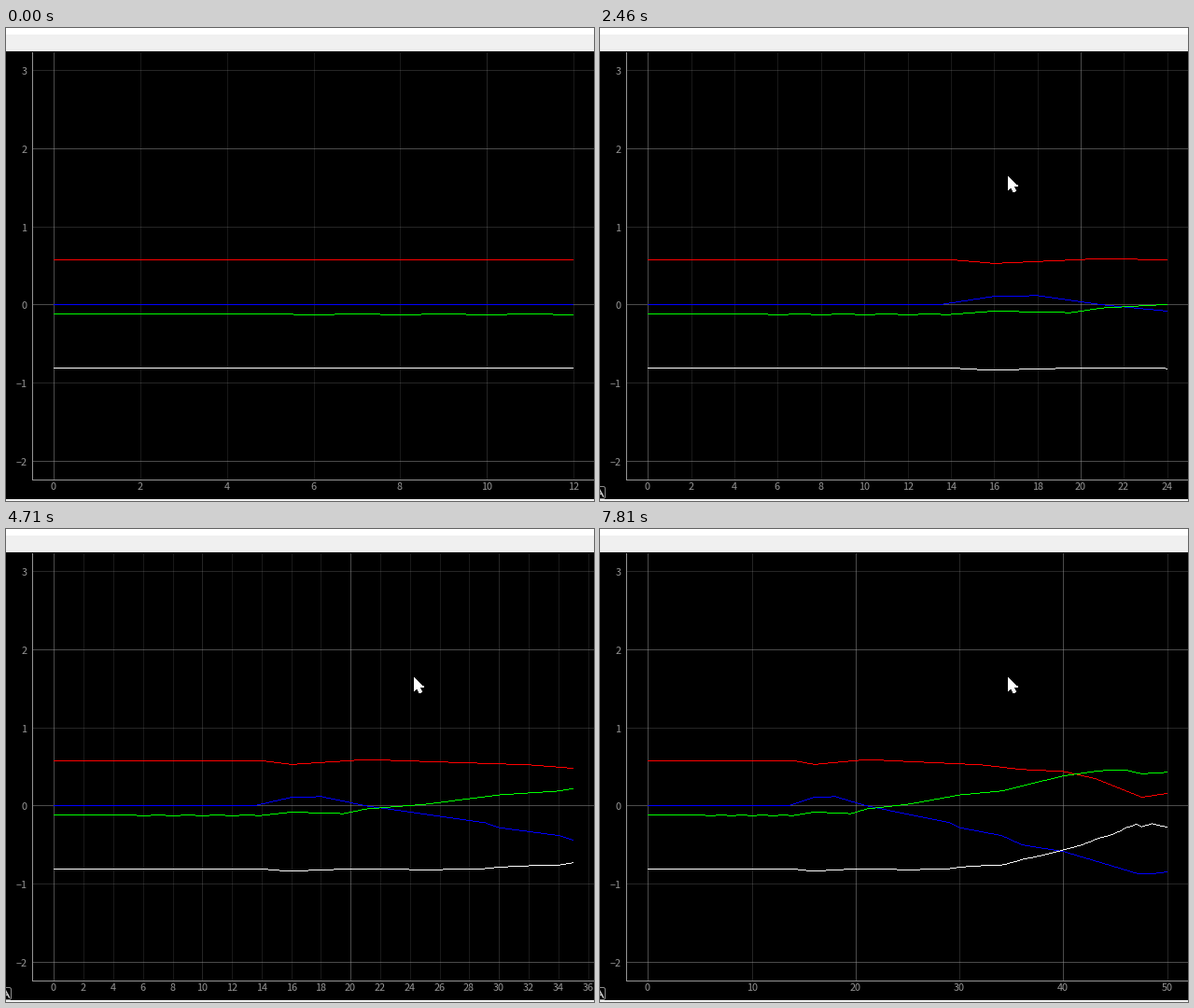
These frames come from a looping animation (630 px wide and 507 px high, 8 s). A matplotlib script:

```python
import numpy as np
import matplotlib.pyplot as plt
from matplotlib.animation import FuncAnimation
from matplotlib.collections import LineCollection
from matplotlib.patches import FancyBboxPatch, Polygon, Rectangle

W, H, DPI = 630, 507, 64
PX = 72 / DPI                       # one pixel in points
STEP, LOOP = 20, 8000               # ms

LEFT, TOP, BOTTOM = 28, 26, 484     # plot area edges
X0, SPAN = 51.9, 556.25             # pixel of sample 0, pixels to newest sample
Y0, UNIT = 296.75, 83.75            # pixel of value 0, pixels per unit
GREY = 150 / 255

SAMPLE_MS, SAMPLE_LEAD = 1240 / 6, 44
MOUSE_START, MOUSE_MS, MOUSE_STEPS = 570, 100, 8
MOUSE_FROM, MOUSE_TO = np.array([336, 452]), np.array([437, 159])
ARROW = np.array([(0, 0), (0, 14.5), (3.4, 11.4), (6, 16.8), (8.6, 15.7),
                  (6.1, 10.5), (10.6, 10.5)])

fig = plt.figure(figsize=(W / DPI, H / DPI), dpi=DPI, facecolor="white")
ax = fig.add_axes([0, 0, 1, 1])
ax.set(xlim=(0, W), ylim=(H, 0))
ax.axis("off")


def path(x, *points):
    return np.interp(x, *zip(*points))


def rotation(x):
    """Components of a unit quaternion at sample position x."""
    red = path(x, (14, .577), (16, .53), (21, .592), (32, .525), (36, .465),
               (40, .44), (43, .35), (47.5, .11), (50, .16))
    green = path(x, (14, -.122), (16, -.08), (19.5, -.1), (21, -.04),
                 (25, .02), (30, .14), (34, .19), (40, .385), (43.5, .45),
                 (46, .457), (47.5, .41), (50, .43))
    green = green - .005 * np.cos(np.pi * x) * ((x > 5) & (x < 14))
    blue = path(x, (13.5, .003), (16, .11), (18, .118), (21, 0), (29, -.215),
                (30, -.28), (34, -.38), (36, -.5), (40, -.585), (47, -.863),
                (48.5, -.87), (50, -.845))
    white = -np.sqrt(1 - red ** 2 - green ** 2 - blue ** 2)
    return blue, red, green, white


def strokes(segments, color, z):
    lines = LineCollection(segments, colors=color, linewidths=PX,
                           capstyle="butt", zorder=z)
    lines.set_snap(False)
    return ax.add_collection(lines, autolim=False)


def label(x, y, text, align):
    return ax.text(x, y, text, ha=align, va="baseline", color=(GREY,) * 3,
                   fontsize=10.8 * PX, family="Noto Sans CJK JP", zorder=5)


def shade(level):
    return (GREY, GREY, GREY, .5 / level)


def runs(cols, rows):
    """Horizontal one-pixel strokes covering the given pixel rows."""
    first = np.r_[0, np.flatnonzero(np.diff(rows)) + 1]
    starts = cols[first]
    ends = np.r_[starts[1:], cols[-1] + 1]
    return [[(a, y + .5), (b, y + .5)]
            for a, b, y in zip(starts, ends, rows[first])]


def add_box(y, height, color):
    ax.add_patch(Rectangle((0, y), W, height, fc=color, lw=0, zorder=0))


add_box(7, H - 7, "#f0f0f0")
add_box(25, 480, "black")

# Value axis
for v in range(-2, 4):
    row = int(Y0 - UNIT * v)
    strokes([[(LEFT, row + .5), (W, row + .5)]], [shade(1 + v % 2)], 1)
    label(22.5, row + 5, str(v).replace("-", "\u2212"), "right")
strokes([[(LEFT + .5, TOP), (LEFT + .5, BOTTOM + 1)],
         [(LEFT, BOTTOM + .5), (W, BOTTOM + .5)]], [(GREY,) * 3], 4)

# Sample axis and signals
grid = strokes([], "none", 1)
ticks = [label(0, 495, "", "center") for _ in range(24)]
signals = [strokes([], color, 3)
           for color in ("#0000ff", "#ff0000", "#00ff00", "#ffffff")]

# Corner button, cut off by the left edge
button = [
    ax.add_patch(FancyBboxPatch((-5.5, 493.5), 9, 9, boxstyle="round,pad=2",
                                fc="black", ec="#8c8c8c", lw=PX, zorder=6)),
    ax.plot([-6.5, -1.5, 3.5], [502, 493, 502], color="#c8c8c8",
            lw=1.6 * PX, zorder=7)[0],
    ax.plot([-4, 2], [499, 499], color="#c8c8c8", lw=1.2 * PX, zorder=7)[0],
]
cursor = ax.add_patch(Polygon(ARROW + MOUSE_TO, fc="white", lw=0,
                              antialiased=False, zorder=8))


def draw_ticks(n):
    scale = SPAN / n
    gap = 2 if 2 * scale >= 30 else 10
    marks = np.arange(0, (W - X0) / scale, gap).astype(int)
    xs = np.floor(X0 + marks * scale) + .5
    grid.set_segments([[(x, TOP), (x, BOTTOM)] for x in xs])
    grid.set_color([shade(1 if m % 20 == 0 else 2 if m % 10 == 0 else 3)
                    for m in marks])
    for i, text in enumerate(ticks):
        text.set_visible(i < len(marks))
        if i < len(marks):
            text.set_text(str(marks[i]))
            text.set_x(xs[i] - .8)


def draw_signals(n):
    cols = np.arange(int(X0), int(X0 + SPAN))
    sample = np.clip((cols + .5 - X0) * n / SPAN, 0, n)
    for lines, values in zip(signals, rotation(sample)):
        lines.set_segments(runs(cols, np.floor(Y0 - UNIT * values)))


def draw_mouse(t):
    moves = np.clip((t - MOUSE_START) // MOUSE_MS + 1, 0, MOUSE_STEPS)
    for part in [cursor, *button]:
        part.set_visible(bool(moves > 0))
    left = (MOUSE_STEPS - max(moves, 1)) / (MOUSE_STEPS - 1)
    cursor.set_xy(ARROW + np.round(MOUSE_TO + (MOUSE_FROM - MOUSE_TO) * left ** 2))


def update(i):
    t = i * STEP + STEP / 2
    n = 12 + int((t + SAMPLE_LEAD) / SAMPLE_MS)
    draw_ticks(n)
    draw_signals(n)
    draw_mouse(t)
    return []


anim = FuncAnimation(fig, update, frames=LOOP // STEP, interval=STEP,
                     repeat=True, repeat_delay=0, blit=False)
plt.show()
```
